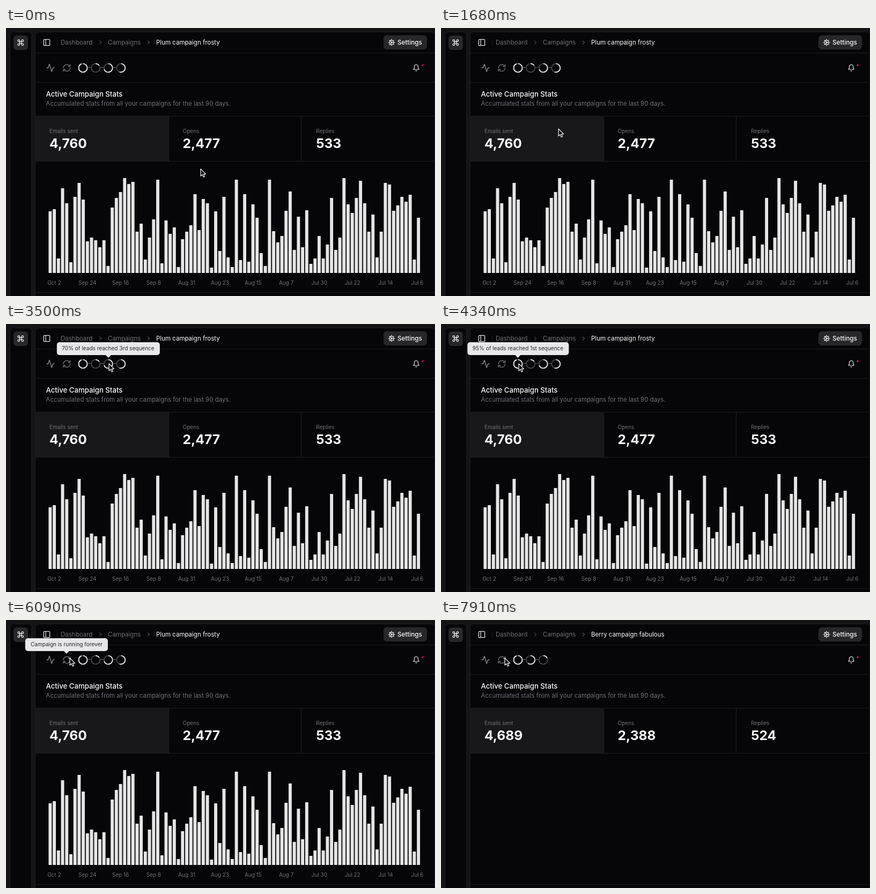
Write an HTML page that moves like this. It is 800x500 px and loops after 8000 ms.

```html
<!DOCTYPE html>
<html lang="en">
<head>
<meta charset="utf-8">
<title>Campaign dashboard</title>
<style>
html, body { margin: 0; width: 100%; height: 100%; overflow: hidden; background: #141416; }
#stage { position: relative; width: 800px; height: 500px; overflow: hidden; font-family: Inter, "Open Sans", sans-serif; }
svg { position: absolute; left: 0; top: 0; }
.icon { fill: none; stroke-width: 2; stroke-linecap: round; stroke-linejoin: round; }
.tip { position: absolute; top: 34px; height: 23.5px; padding: 0 10px; transform: translateX(-50%); border-radius: 5px;
  background: #e8e8ea; color: #27272a; font-size: 10.04px; line-height: 23.5px; white-space: nowrap; opacity: 0; }
.tip::after { content: ""; position: absolute; left: 50%; top: 100%; margin-left: -5px;
  border: 5px solid transparent; border-bottom: 0; border-top-color: #e8e8ea; }
</style>
</head>
<body>
<div id="stage">
  <svg id="page" width="800" height="500"></svg>
  <svg width="800" height="500" style="z-index:2">
    <path id="cursor" d="M0 0V13.2L3.1 10.4 5.2 15.2 7.4 14.2 5.3 9.6H9.6Z" fill="#09090b" stroke="#f4f4f5" stroke-width="1.2" stroke-linejoin="round"/>
  </svg>
</div>
<script>
const LOOP = 8000, SWITCH = 7420;
const WHITE = '#fafafa', GRAY = '#6f6f77', LINE = '#1d1d20', PANEL = '#060608';

const text = (x, y, size, fill, str, extra = '') =>
  `<text x="${x}" y="${y}" font-size="${size}" fill="${fill}" ${extra}>${str}</text>`;
const box = (x, y, w, h, r, fill, extra = '') =>
  `<rect x="${x}" y="${y}" width="${w}" height="${h}" rx="${r}" fill="${fill}" ${extra}/>`;
const line = d => `<path d="${d}" stroke="${LINE}"/>`;
// Icons live on a 24 unit grid, placed by their centre.
const icon = (cx, cy, size, color, d) =>
  `<path class="icon" stroke="${color}" transform="translate(${cx - size / 2} ${cy - size / 2}) scale(${size / 24})" d="${d}"/>`;

const ring = (percent, i) => {
  const x = 143.5 + 23.6 * i, circle = `cx="${x}" cy="74.5" r="8" fill="none" stroke-width="1.7"`;
  return (i ? `<path d="M${x - 15.5} 73.5h7" stroke="#5c5c63"/>` : '') +
    `<circle ${circle} stroke="#4a4a50"/>` +
    `<circle ${circle} stroke="${WHITE}" pathLength="100" stroke-dasharray="${percent} 100" transform="rotate(-90 ${x} 74.5)"/>`;
};

const scene = (id, title, rings, stats, chart = '') => `<g id="${id}">` +
  text(280, 31, 11.5, WHITE, title) + rings.map(ring).join('') +
  stats.map((n, i) => text(81 + 248.6 * i, 224, 24.6, WHITE, n, 'font-weight="700"')).join('') + chart + '</g>';

const tops = [342,338,430,299,327,437,315,289,320,398,391,396,409,396,444,335,317,306,280,291,287,380,365,432,391,357,283,439,359,384,
  372,446,394,380,368,310,377,319,327,447,342,416,315,428,446,283,433,310,436,329,354,420,444,283,379,400,388,341,305,414,
  352,409,340,440,430,388,430,404,317,414,391,280,329,345,317,285,327,380,348,428,380,289,292,341,331,315,324,311,432,354];
const dates = ['Oct 2', 'Sep 24', 'Sep 16', 'Sep 8', 'Aug 31', 'Aug 23', 'Aug 15', 'Aug 7', 'Jul 30', 'Jul 22', 'Jul 14', 'Jul 6'];
const chart =
  tops.map((y, i) => box(79.4 + 7.717 * i, y, 5.9, 457 - y, 0.6, '#e5e5e5')).join('') +
  dates.map((d, i) => text(Math.min(90 + 61.8 * i, 767), 479, 10, GRAY, d, 'text-anchor="middle"')).join('');

const chevron = 'm9 18 6-6-6-6';
document.getElementById('page').innerHTML =
  box(7.5, 7.5, 40, 520, 6, PANEL, `stroke="${LINE}"`) +
  box(54.5, 7.5, 745, 520, 6, PANEL, `stroke="${LINE}"`) +
  box(14, 14, 27, 27, 6, '#27272a') +
  icon(27.3, 27.2, 14.4, WHITE, 'M15 6v12a3 3 0 1 0 3-3H6a3 3 0 1 0 3 3V6a3 3 0 1 0-3 3h12a3 3 0 1 0-3-3') +
  icon(76, 27, 15, '#e4e4e7', 'M5 3h14a2 2 0 0 1 2 2v14a2 2 0 0 1-2 2H5a2 2 0 0 1-2-2V5a2 2 0 0 1 2-2zM9 3v18') +
  line('M95.5 21V34') +
  text(102, 31, 11.5, GRAY, 'Dashboard') + icon(176, 27, 12, GRAY, chevron) +
  text(190, 31, 11.5, GRAY, 'Campaigns') + icon(266, 27, 12, '#909097', chevron) +
  box(704, 13.5, 81, 26.5, 6, '#27272a') +
  icon(719, 27, 14, WHITE, 'M19 12a7 7 0 1 1-14 0 7 7 0 0 1 14 0M14 12a2 2 0 1 1-4 0 2 2 0 0 1 4 0M12 2v3M12 19v3M2 12h3M19 12h3M5 5l2 2M17 17l2 2M5 19l2-2M17 7l2-2M14 12h5M11 10.3 8.5 6M11 13.7 8.5 18') +
  text(730, 31, 11.7, WHITE, 'Settings', 'font-weight="500"') +
  icon(83, 74.3, 16.7, '#8b8b92', 'M22 12h-2.48a2 2 0 0 0-1.93 1.46l-2.35 8.36a.25.25 0 0 1-.48 0L9.24 2.18a.25.25 0 0 0-.48 0l-2.35 8.36A2 2 0 0 1 4.49 12H2') +
  icon(113.3, 74.5, 16.7, '#6f6f76', 'M3 12a9 9 0 0 1 9-9 9.75 9.75 0 0 1 6.74 2.74L21 8M21 3v5h-5M21 12a9 9 0 0 1-9 9 9.75 9.75 0 0 1-6.74-2.74L3 16M8 16H3v5') +
  icon(765, 74.3, 14, '#e4e4e7', 'M6 8a6 6 0 0 1 12 0c0 7 3 9 3 9H3s3-2 3-9M10.3 21a1.94 1.94 0 0 0 3.4 0') +
  '<circle cx="777" cy="69.3" r="1.6" fill="#e11d48"/>' +
  text(74.5, 127.5, 13.2, WHITE, 'Active Campaign Stats', 'font-weight="500"') +
  text(74.5, 145, 11.45, GRAY, 'Accumulated stats from all your campaigns for the last 90 days.') +
  box(55, 165, 248, 83, 0, '#18181a') +
  line('M55 46.5H799M55 101.5H799M55 164.5H799M55 248.5H799M303.5 165V248M550.5 165V248M55 493.5H799') +
  ['Emails sent', 'Opens', 'Replies'].map((s, i) => text(81 + 248.6 * i, 196, 10, GRAY, s)).join('') +
  scene('before', 'Plum campaign frosty', [95, 15, 70, 55], ['4,760', '2,477', '533'], chart) +
  scene('after', 'Berry campaign fabulous', [95, 60, 18], ['4,689', '2,388', '524']);

const tips = [
  [190.5, '70% of leads reached 3rd sequence', 3100, 3850],
  [143.5, '95% of leads reached 1st sequence', 3990, 4720],
  [82.5, 'Campaign is not active', 4960, 5600],
  [113, 'Campaign is running forever', 5810, SWITCH - 20]
].map(([x, label, from, to]) => {
  const el = document.createElement('div');
  el.className = 'tip';
  el.style.left = x + 'px';
  el.textContent = label;
  stage.append(el);
  return { el, from, to };
});

// Cursor stops: time, x, y
const stops = [
  [0, 363, 263], [840, -16, 130], [1260, -16, 80], [1820, 262, 208], [2030, 262, 208], [2520, 221, 75],
  [2590, 221, 75], [2660, 220, 74], [2870, 220, 74], [3430, 192, 74], [3710, 192, 74], [4270, 145, 74],
  [4550, 145, 74], [5110, 84, 70], [5460, 84, 70], [6090, 119, 71], [LOOP, 119, 71]
];

const clamp = v => Math.max(0, Math.min(1, v));
const ease = p => p * p * (3 - 2 * p);

function draw(t) {
  const i = stops.findIndex(s => s[0] > t);
  const [t0, x0, y0] = stops[i - 1], [t1, x1, y1] = stops[i];
  const p = ease((t - t0) / (t1 - t0));
  cursor.setAttribute('transform', `translate(${x0 + (x1 - x0) * p} ${y0 + (y1 - y0) * p})`);
  for (const { el, from, to } of tips)
    el.style.opacity = clamp((t - from) / 100) * clamp((to + 70 - t) / 70);
  before.style.display = t < SWITCH ? '' : 'none';
  after.style.display = t < SWITCH ? 'none' : '';
}

const stage0 = performance.now();
function tick() {
  draw((performance.now() - stage0) % LOOP);
  requestAnimationFrame(tick);
}
tick();
</script>
</body>
</html>
```
